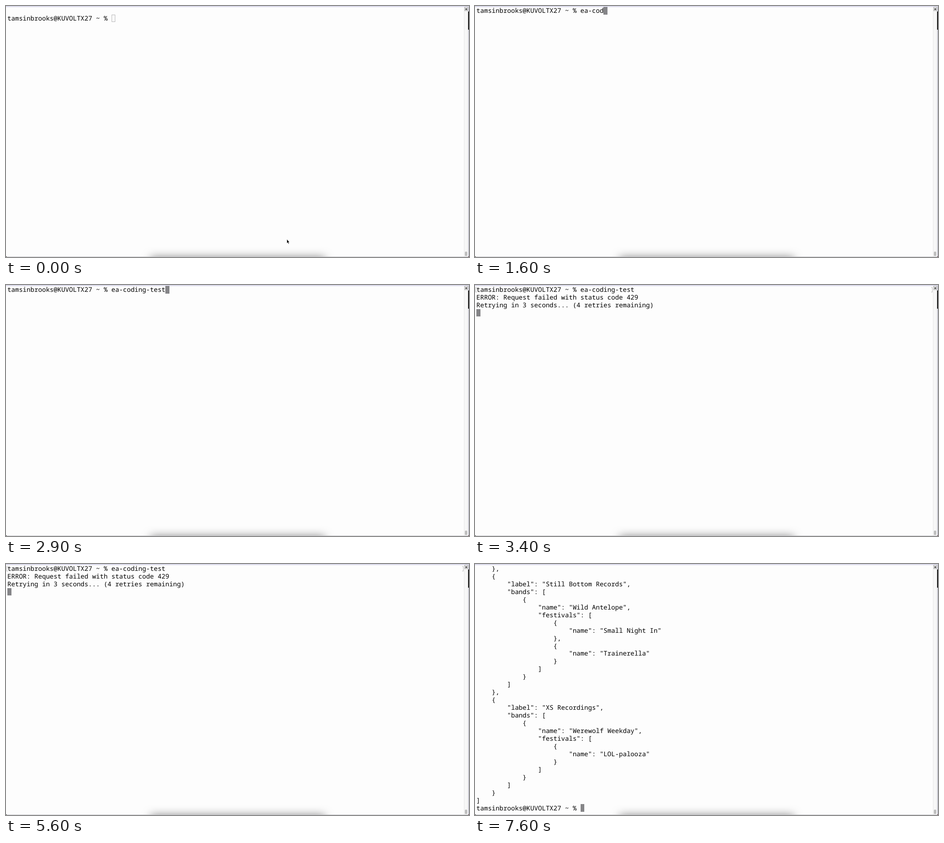
Animation of 1017 by 551 pixels, one loop 7.7 s. Source, as an HTML page:

```html
<!DOCTYPE html>
<html lang="en">
<head>
<meta charset="utf-8">
<title>Terminal session</title>
<style>
  html, body { margin: 0; width: 100%; height: 100%; overflow: hidden; }
  #stage {
    --col: 8.467px;
    --row: 16.95px;
    position: relative; width: 1017px; height: 551px;
    overflow: hidden; background: #fdfdfd;
  }
  #stage > * { position: absolute; box-sizing: border-box; }
  #screen {
    left: 3px; top: 3px; margin: 0; color: #000;
    font: 14.11px/var(--row) "Noto Sans Mono", "DejaVu Sans Mono", monospace;
    font-variant-ligatures: none;
    text-rendering: geometricPrecision;
    white-space: pre;
  }
  #cursor {
    left: calc(3px + var(--x) * var(--col));
    top: calc(2px + var(--y) * var(--row));
    width: 8.5px; height: 16.5px; background: #858588;
  }
  #cursor.idle { background: none; border: 1px solid #b4b4b6; }
  .mark { top: 5px; width: 3px; height: 11px; border: 1px solid #bdbdbd; }
  .mark.open { left: 1px; border-right: 0; }
  .mark.close { left: 1002px; border-left: 0; }
  .top { left: 0; top: 0; width: 1017px; height: 3px; background: linear-gradient(#e4e4ee 1px, #d4d2e8 1px 2px, #f1f1f6 2px); }
  .bottom { left: 0; top: 550px; width: 1017px; height: 1px; background: #c6c6ca; }
  .track { left: 1006px; top: 2px; width: 10px; height: 548px; background: #f7f7f7; border-left: 1px solid #e6e6e6; }
  .split { left: 1007px; top: 2px; width: 8px; height: 9px; background: #f0f0f0; border: 1px solid #b0b0b0; }
  .split::after { content: ""; position: absolute; left: 1px; top: 2px; width: 4px; height: 4px; background: #666; }
  .thumb { left: 1008px; top: 539px; width: 5px; height: 10px; border-radius: 2.5px; background: #bcbcbc; }
  .edge { left: 1015px; top: 0; width: 2px; height: 551px; background: linear-gradient(#d0d0da 12px, #111 12px 52px, #c9c9d2 52px); }
  .shade { left: 318px; top: 552px; width: 382px; height: 40px; box-shadow: 0 0 20px rgba(0, 0, 0, .5); }
  .corner { top: 547px; width: 4px; height: 4px; }
  .corner.left { left: 0; background: radial-gradient(circle at 100% 0, transparent 4px, #333 4.5px); }
  .corner.right { left: 1013px; background: radial-gradient(circle at 0 0, transparent 4px, #5a2529 4.5px); }
  #pointer { left: 616px; top: 511px; }
  [hidden] { display: none; }
</style>
</head>
<body>
<div id="stage">
  <div class="shade"></div>
  <div class="top"></div>
  <div class="bottom"></div>
  <div class="track"></div>
  <div class="split"></div>
  <div class="thumb"></div>
  <div class="edge"></div>
  <div class="corner left"></div>
  <div class="corner right"></div>
  <div class="mark open" hidden></div>
  <div class="mark close" hidden></div>
  <div id="cursor"></div>
  <pre id="screen"></pre>
  <svg id="pointer" width="8" height="13" viewBox="0 0 8 13">
    <path d="M1 1V10L3 8.2L4.4 11.4L5.8 10.8L4.4 7.7H6.8Z" fill="#000" stroke="#fff" stroke-width=".6"/>
  </svg>
</div>
<script>
const LOOP = 7700;
const FOCUS = 200, CLEAR = 500, ENTER = 3100, FAIL = 3400, DONE = 6700;

const prompt = "tamsinbrooks@KUVOLTX27 ~ % ";
const command = "ea-coding-test";
const keyTimes = [800, 1000, 1200, 1300, 1400, 1600, 1700, 1800, 2000, 2200, 2300, 2500, 2700, 2900];

const failure = "ERROR: Request failed with status code 429\n" +
  "Retrying in 3 seconds... (4 retries remaining)\n";

const entry = (label, band, ...festivals) => ({
  label,
  bands: [{ name: band, festivals: festivals.map(name => ({ name })) }]
});
const listing = JSON.stringify([
  entry("Still Bottom Records", "Wild Antelope", "Small Night In", "Trainerella"),
  entry("XS Recordings", "Werewolf Weekday", "LOL-palooza")
], null, 4);
// Only the tail of the listing is in view: its first row closes an earlier entry.
const tail = listing.replace("[", "    },") + "\n" + prompt;

const screen = document.getElementById("screen");
const cursor = document.getElementById("cursor");
const pointer = document.getElementById("pointer");
const marks = document.querySelectorAll(".mark");

function textAt(t) {
  if (t < CLEAR) return "\n" + prompt;
  if (t >= DONE) return tail;
  const typed = command.slice(0, keyTimes.filter(k => k <= t).length);
  return prompt + typed + (t >= ENTER ? "\n" : "") + (t >= FAIL ? failure : "");
}

function draw(t) {
  const text = textAt(t);
  if (screen.textContent !== text) screen.textContent = text;
  const rows = text.split("\n");
  cursor.style.setProperty("--x", rows[rows.length - 1].length);
  cursor.style.setProperty("--y", rows.length - 1);
  cursor.classList.toggle("idle", t < FOCUS);
  pointer.style.display = t < CLEAR ? "" : "none";
  marks.forEach(m => { m.hidden = t < ENTER || t >= DONE; });
}

const start = performance.now();
function tick() {
  draw((performance.now() - start) % LOOP);
  requestAnimationFrame(tick);
}
tick();
</script>
</body>
</html>
```
